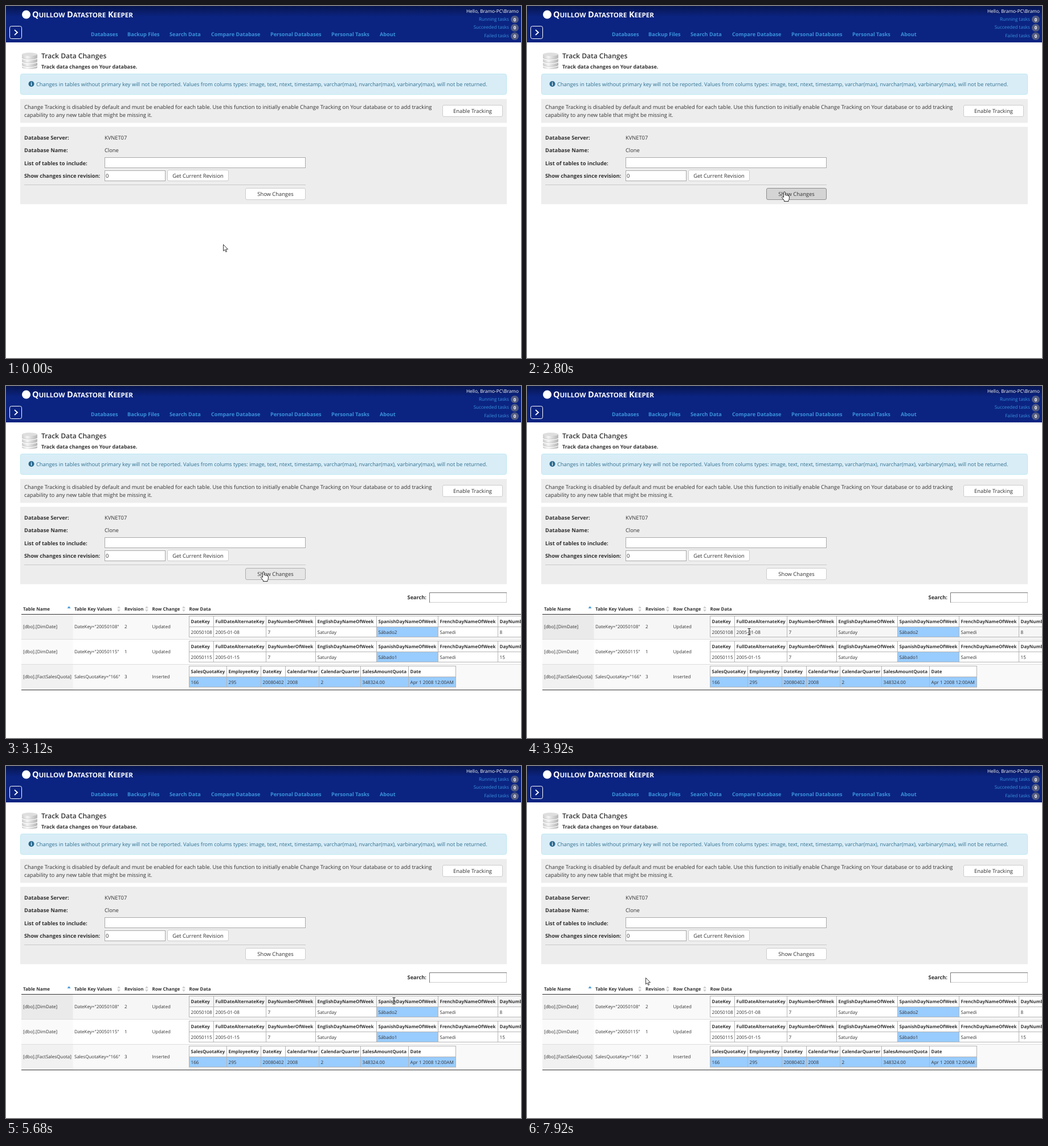
An HTML page that plays this animation: 904x619 px, repeating every 8000 ms.

```html
<!DOCTYPE html>
<html lang="en">
<head>
<meta charset="utf-8">
<title>Track Data Changes</title>
<style>
html, body { margin: 0; width: 100%; height: 100%; overflow: hidden; background: #fff; }
svg { display: block; width: 904px; height: 619px; font-family: "Open Sans", "Noto Sans", sans-serif; text-rendering: geometricPrecision; }
</style>
</head>
<body>
<svg id="stage" viewBox="0 0 904 619"></svg>
<script>
const LOOP = 8000, STEP = 80, RESULTS = 3040, TABLE = 3120;
const BLUE = '#3a92dc', NAVY = '#0b2482';
const stage = document.getElementById('stage');

// Pointer hot spot: time, x, y
const path = [
  [0, 381, 419], [400, 381, 419], [1280, 239, 294], [1480, 203, 268], [1760, 206, 294],
  [2160, 452, 323], [2400, 452, 327], [3520, 452, 327], [3760, 390, 432], [3920, 390, 432],
  [4480, 400, 514], [4640, 400, 514], [4960, 520, 526], [5520, 690, 430], [5680, 681, 413],
  [5760, 681, 413], [5920, 690, 444], [6000, 690, 444], [6400, 470, 465], [6880, 293, 393],
  [7040, 249, 471], [7360, 252, 500], [7520, 252, 500], [7920, 208, 372]
];

const dayHead = 'DateKey FullDateAlternateKey DayNumberOfWeek EnglishDayNameOfWeek SpanishDayNameOfWeek FrenchDayNameOfWeek DayNumberOfMonth'.split(' ');
const saleHead = 'SalesQuotaKey EmployeeKey DateKey CalendarYear CalendarQuarter SalesAmountQuota Date'.split(' ');
const rows = [
  { cells: ['[dbo].[DimDate]', 'DateKey="20050108"', '2', 'Updated'], head: dayHead,
    vals: ['20050108', '2005-01-08', '7', 'Saturday', 'Sábado2', 'Samedi', '8'] },
  { cells: ['[dbo].[DimDate]', 'DateKey="20050115"', '1', 'Updated'], head: dayHead,
    vals: ['20050115', '2005-01-15', '7', 'Saturday', 'Sábado1', 'Samedi', '15'] },
  { cells: ['[dbo].[FactSalesQuota]', 'SalesQuotaKey="166"', '3', 'Inserted'], head: saleHead,
    vals: ['166', '295', '20080402', '2008', '2', '348324.00', 'Apr 1 2008 12:00AM'] }
];
const titles = ['Table Name', 'Table Key Values', 'Revision', 'Row Change', 'Row Data'];
const plain = {
  day: [416.5, 454.5, 540.5, 621.5, 722.5, 826.5, 926.5, 1020],
  sale: [416.5, 477.5, 531.5, 568.5, 622.5, 689.5, 768.5, 845.5]
};
const styled = {
  day: [321.5, 364.5, 456.5, 543.5, 650.5, 758.5, 863.5, 960],
  sale: [321.5, 387.5, 447.5, 490.5, 549.5, 622.5, 706.5, 789.5]
};
const servers = [
  [75, 'KVNET07', 84, '3 %', '0,4 MB/s', '0 %', '144,00 GB'],
  [131.5, 'KVNET_LAB07', 84, '3 %', '0,4 MB/s', '0 %', '144,00 GB'],
  [188, 'LIVE_KVNET07', 93, '1289 MB', '1 %', '0,0 MB/s', '0 %', '60,65 GB', '100'],
  [263, 'LIVE_KVNET08', 93, '1297 MB', '0 %', '0,0 MB/s', '0 %', '39,00 GB', '100']
];
const shortStats = ['CPU Usage:', 'Disk Transfer:', 'Disk Usage:', 'Disk D Free Space:'];
const longStats = ['Available RAM:', 'CPU Usage:', 'Disk Transfer:', 'Disk Usage:', 'Disk C Free Space:', 'Buff Cache Hit Ratio:'];

// Baselines sit on whole pixels
const text = (x, y, s, size = 9.3, fill = '#333', weight = 400, anchor = 'start') =>
  `<text x="${x}" y="${Math.round(y)}" font-size="${size}" fill="${fill}" font-weight="${weight}" text-anchor="${anchor}">${s}</text>`;
const bold = (x, y, s, size = 9.3, fill = '#333', anchor) => text(x, y, s, size, fill, 700, anchor);
const rect = (x, y, w, h, fill, stroke = 'none', r = 0) =>
  `<rect x="${x}" y="${y}" width="${w}" height="${h}" rx="${r}" fill="${fill}" stroke="${stroke}"/>`;
const shape = (d, fill, stroke = 'none', width = 1) =>
  `<path d="${d}" fill="${fill}" stroke="${stroke}" stroke-width="${width}"/>`;
const at = (x, y, s) => `<g transform="translate(${x} ${y})">${s}</g>`;
const inside = (p, x, y, w, h) => p.x >= x && p.x < x + w && p.y >= y && p.y < y + h;

const button = (x, y, w, h, label, fill = '#fff', stroke = '#ccc') =>
  rect(x + .5, y + .5, w - 1, h - 1, fill, stroke, 2.5) +
  text(x + w / 2, y + h / 2 + 3.5, label, 9.35, '#333', 400, 'middle');

function pointerAt(t) {
  const i = path.findIndex(k => k[0] >= t);
  if (i < 1) return { x: path[0][1], y: path[0][2] };
  const [t0, x0, y0] = path[i - 1], [t1, x1, y1] = path[i];
  const k = (t - t0) / (t1 - t0);
  return { x: Math.round(x0 + (x1 - x0) * k), y: Math.round(y0 + (y1 - y0) * k) };
}

function header(open) {
  const brand = 'Quillow Datastore Keeper'.replace(/\B\w+/g, s => `<tspan font-size="11.6">${s.toUpperCase()}</tspan>`);
  const nav = [[149, 'Databases'], [213, 'Backup Files'], [287, 'Search Data'], [360, 'Compare Database'],
    [464, 'Personal Databases'], [571, 'Personal Tasks'], [656, 'About']];
  const tasks = ['Running', 'Succeeded', 'Failed'];
  return rect(0, 0, 904, 64, 'url(#top)') +
    '<circle cx="35.5" cy="15" r="7.5" fill="#fff"/>' +
    bold(46, 20, brand, 14.5, '#fff') +
    nav.map(([x, s]) => bold(x, 53, s, 9.15, BLUE)).join('') +
    text(900, 12, 'Hello, Bramo-PC\\Bramo', 8.3, '#fff', 500, 'end') +
    tasks.map((s, i) => {
      const y = 23 + i * 14.8;
      return text(883, y + 2.5, s + ' tasks', 8.15, BLUE, 400, 'end') +
        rect(886, y - 6, 14, 13, '#545d80', 'none', 6.5) + bold(893, y + 3.6, '0', 8, '#fff', 'middle');
    }).join('') +
    rect(6.5, 35.5, 21, 22, 'none', '#fff', 3) +
    shape(open ? 'M19 42l-5 4.5 5 4.5' : 'M15 42l5 4.5-5 4.5', 'none', '#fff', 1.8);
}

function sidebar() {
  return rect(0, 64, 141, 555, NAVY) + servers.map(([y, name, x, ...vals]) => {
    const labels = vals.length > 4 ? longStats : shortStats;
    return bold(69, y + 3, name, 8.3, BLUE, 'middle') + vals.map((v, i) => {
      const base = y + 3 + 9.25 * (i + 1);
      return text(7, base, labels[i], 8.1, BLUE) + text(x, base, v, 8.1, BLUE);
    }).join('');
  }).join('');
}

function discs() {
  const ring = y => `M28 ${y}a13.5 3 0 0 0 27 0`;
  return shape('M28 85v23a13.5 3 0 0 0 27 0v-23z', 'url(#metal)') +
    '<ellipse cx="41.5" cy="85" rx="13.5" ry="3" fill="#dedede"/>' +
    [91.5, 98, 104.5].map(y => shape(ring(y), 'none', '#fff', 1.5) + shape(ring(y - 1), 'none', '#b4b4b4', .6)).join('');
}

function form(open, p, t) {
  const dx = open ? 141 : 0, dy = open ? 14 : 0, left = 25 + dx, w = 854 - dx;
  const note = ['Changes in tables without primary key will not be reported. Values from colums types: image, text, ntext, timestamp, varchar(max), nvarchar(max),', 'varbinary(max), will not be returned.'];
  const help = ['Change Tracking is disabled by default and must be enabled for each table. Use this function to initially enable Change Tracking on',
    'Your database or to add tracking', 'capability to any new table that might be missing it.'];
  const lines = open ? [help[0], help[1] + ' ' + help[2]] : [help[0] + ' ' + help[1], help[2]];
  const over = !open && inside(p, 420, 320, 106, 21), down = t === 2800;
  const spin = !open && inside(p, 173, 289, 107, 19);

  const top = discs() +
    text(62, 92, 'Track Data Changes', 12.05, '#333', 600) +
    bold(62, 110.4, 'Track data changes on Your database.', 8.95);
  const alert = rect(left + .5, 119.5, w - 1, 36 + dy, '#d9edf7', '#bce8f1', 3) +
    at(dx, 0, '<circle cx="44.5" cy="137" r="5" fill="#2b6a90"/>' + bold(44.5, 140, 'i', 8.5, '#fff', 'middle') +
      (open ? text(53, 141, note[0], 9.32, '#31708f') + text(53, 155, note[1], 9.32, '#31708f')
            : text(53, 141, note.join(' '), 9.32, '#31708f')));
  const fields = [['Database Server:', 'KVNET07'], ['Database Name:', 'Clone'], ['List of tables to include:', ''], ['Show changes since revision:', '']]
    .map(([s, v], i) => bold(32, 234.6 + i * 22.5, s) + text(173, 234.6 + i * 22.5, v)).join('');
  const inputs = rect(173.5, 266.5, 352, 18, '#fff', '#a9a9a9') +
    rect(173.5, 289.5, 106, 18, '#fff', '#a9a9a9') + text(175, 302, '0') +
    (spin ? rect(268, 290.5, 11, 16, '#f4f4f4') + shape('M270.5 296.5h6l-3-3.5zM270.5 300.5h6l-3 3.5z', '#333') : '') +
    button(283, 288, 108, 20, 'Get Current Revision') +
    shape('M32 314.5H526', 'none', '#c8c8c8') +
    button(420, 320, 106, 21, 'Show Changes', down ? '#d4d4d4' : over ? '#e6e6e6' : '#fff', down ? '#8c8c8c' : over ? '#adadad' : '#ccc');

  return at(dx, 0, top) + alert + at(0, dy,
    rect(left, 163.5, w, 42, '#ededed') + rect(left, 212.5, w, 136, '#ededed') +
    lines.map((s, i) => text(32 + dx, 181 + i * 14, s, 9.44)).join('') +
    button(766, 174, 106, 21, 'Enable Tracking') + at(dx, 0, fields + inputs));
}

// Inner two-line table: column names over values
function grid(row, xs, y, h, pad, p) {
  const end = xs[xs.length - 1], sale = row.head === saleHead;
  const lines = [row.head, row.vals].map((list, r) => {
    const top = y + r * h, high = h - r, base = top + high / 2 + 3;
    const hot = p && inside(p, xs[0], top, end - xs[0], high);
    return list.map((s, i) => {
      const mark = r && (sale || i === 4);
      return rect(xs[i], top, xs[i + 1] - xs[i], high, mark ? '#9cf' : hot ? '#f6f6f6' : '#fff', '#b4b4b4') +
        (r ? text(xs[i] + pad, base, s, 8.15) : bold(xs[i] + pad, base, s, 8));
    }).join('');
  });
  return lines.join('');
}

const columns = (row, set) => row.head === saleHead ? set.sale : set.day;

function plainTable() {
  const xs = [166, 251, 333, 367, 417];
  return titles.map((s, i) => bold(xs[i], 386, s, 8)).join('') + rows.map((row, i) =>
    row.cells.map((s, c) => text(xs[c], 405 + i * 26.2, s, 8)).join('') +
    grid(row, columns(row, plain), 389.5 + i * 26, 13, 1)).join('');
}

function styledTable(p) {
  const xs = [30, 120, 208, 256.5, 321.5], pitch = 43.9;
  const sorters = [198, 247, 312].map(x => shape(`M${x - 3} 391h6l-3-4zM${x - 3} 393h6l-3 4z`, '#cfcfcf')).join('');
  const body = rows.map((row, i) => {
    const y = 402 + i * pitch, hot = p.x > 27 && p.y >= y && p.y < y + pitch, odd = i % 2 === 0;
    return rect(27, y, 877, pitch, hot ? '#f6f6f6' : odd ? '#f9f9f9' : '#fff') +
      rect(27, y, 90.5, pitch, hot ? '#eaeaea' : odd ? '#f1f1f1' : '#fafafa') +
      (i ? shape(`M27 ${Math.round(y) - .5}H904`, 'none', '#ddd') : '') +
      row.cells.map((s, c) => text(xs[c], y + 24.3, s, 8)).join('') +
      grid(row, columns(row, styled), Math.round(y + 2) + .5, 19, 3, p);
  }).join('');
  return bold(738, 375, 'Search:', 9.2, '#333', 'end') +
    rect(743.5, 363.5, 135, 17, '#fff', '#ccc') + shape('M743.5 381V363.5H879', 'none', '#777') +
    titles.map((s, i) => bold(xs[i], 395, s, 8)).join('') +
    shape('M107.5 391h6l-3-4z', '#4a9bd9') + sorters + body +
    shape('M27 401.5H904M27 534.5H904', 'none', '#333');
}

function pointer(p, t) {
  const open = t === RESULTS, table = t >= TABLE;
  const link = !open && inside(p, 420, 320, 106, 21) || table && inside(p, 27, 382, 340, 19);
  const beam = !open && (inside(p, 173, 267, 353, 18) || inside(p, 173, 289, 107, 19)) ||
    table && inside(p, 321, 404, 583, 127);
  const s = link
    ? shape('M-1.5 8V1.2q0-1.4 1.4-1.4T1.3 1.2V5.5q2-.8 2.5.5 2-.6 2.4.7 2.2-.4 2.2 1.6V11.5q0 2-1.4 3.2V16.6H-.5V15L-4 10.6q-1-1.7.3-2.2 1.1-.2 2.2 1.2z', '#fff', '#111', .9)
    : beam
      ? shape('M-2.5-5.5h2l.5.5.5-.5h2M-2.5 5.5h2l.5-.5.5.5h2M0-5V5', 'none', '#222', 1.1)
      : shape('M.5.5V11.8L3 9.5l1.9 4 1.7-.8L4.8 8.8H8.5z', '#fff', '#222', .9);
  return at(p.x, p.y, s);
}

const defs = `<defs>
  <linearGradient id="top" x1="0" y1="0" x2="0" y2="1"><stop stop-color="#07154f"/><stop offset=".3" stop-color="${NAVY}"/></linearGradient>
  <linearGradient id="metal"><stop stop-color="#cdcdcd"/><stop offset=".35" stop-color="#f4f4f4"/><stop offset="1" stop-color="#b4b4b4"/></linearGradient>
</defs>`;

function scene(t) {
  const p = pointerAt(t), open = t === RESULTS;
  return defs + header(open) + (open ? sidebar() : '') + form(open, p, t) +
    (open ? plainTable() : t >= TABLE ? styledTable(p) : '') + pointer(p, t);
}

let shown = -1;
function frame() {
  const t = Math.floor(performance.now() % LOOP / STEP) * STEP;
  if (t !== shown) stage.innerHTML = scene(shown = t);
  requestAnimationFrame(frame);
}
frame();
</script>
</body>
</html>
```
